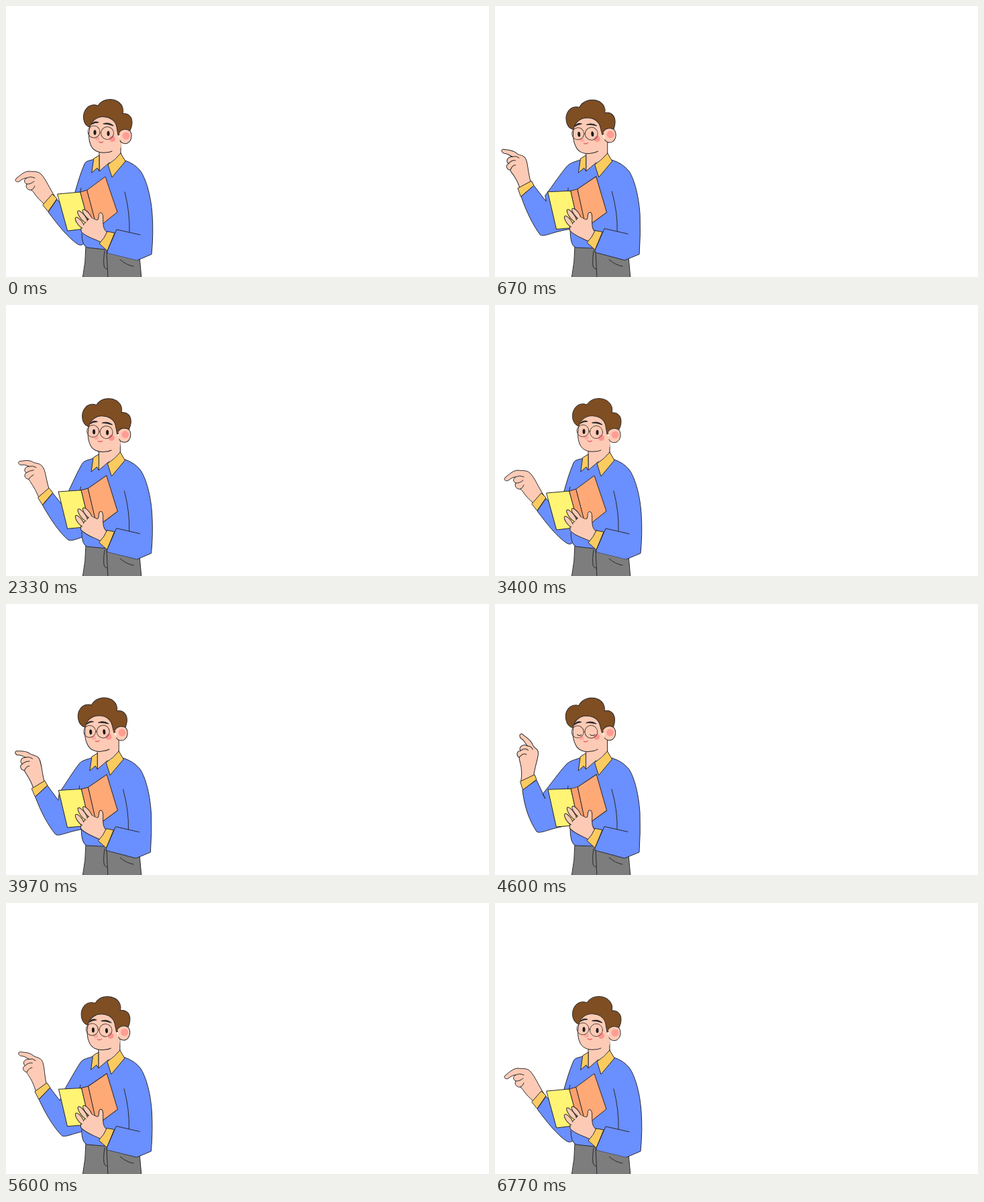
Write an HTML page that moves like this. It is 720x405 px and loops after 6810 ms.

```html
<!DOCTYPE html>
<html lang="en">
<head>
<meta charset="utf-8">
<title>Teacher with a book</title>
<style>
  html, body { margin: 0; width: 100%; height: 100%; overflow: hidden; background: #fff; }
  svg { display: block; width: 100vw; height: 100vh; }
  .ink { fill: none; stroke: #2b292c; stroke-width: 1; stroke-linecap: round; stroke-linejoin: round; }
  .skin { fill: #fdcbb5; }
  .blue { fill: #6a8ffe; }
  .gold { fill: #fccb60; }
  .hair { fill: #7f4e22; }
  .plain { stroke: none; }
</style>
</head>
<body>
<svg viewBox="0 0 720 405" class="ink">
  <path fill="#7d7d7d" d="M119 358 Q119 382 114 408 H202 L199 374 L150 362 Z"/>
  <path d="M150 366 L152 408 M147 366 Q145 379 146 388 Q147 393 151 393 M170 379 Q179 387 190 389"/>

  <path id="hand" class="skin"/>
  <path id="fingers"/>
  <path id="cuff" class="gold"/>
  <path id="arm" class="blue"/>
  <path id="torso" class="blue plain"/>
  <path id="torsoEdge"/>

  <g id="neck">
    <path class="skin plain" d="M139 205 V247 L155 234 L171 221 V196 Z"/>
    <path d="M139 217 V247 L154 234 M171 203 V221"/>
    <path class="gold" d="M131 228 L139 223 V247 L136 242 L128 249 Z"/>
    <path class="gold" d="M171 220 L178 232 L158 256 L152 237 Q164 229 171 220 Z"/>
  </g>

  <g id="head">
    <path class="hair" d="M124 181 C114 177 113 161 120 153 C125 147 132 147 137 149 C143 139 157 137 167 143 C174 148 176 155 174 161 C182 160 188 165 188 174 C188 180 186 184 184 188 L167 193 L150 180 Z"/>
    <path class="skin plain" d="M125 181 C128 170 138 164 148 166 C158 167 164 174 165 181 L167 193 L172 206 L171 212 L159 217 Q154 219 148 219 C138 220 129 216 126 207 C123 200 123 190 125 181 Z"/>
    <path d="M167 193 L165 181 C164 174 158 167 148 166 C138 164 128 170 125 181 C123 190 123 200 126 207 C129 216 138 220 148 219 Q154 219 158 217"/>
    <path class="skin" d="M169 189 C172 184 180 183 185 187 C189 193 187 202 181 205 C176 207 171 204 170 201"/>
    <circle class="plain" cx="179" cy="194" r="5.5" fill="#ff9d94"/>
    <circle class="plain" cx="158.500" cy="198.500" r="4.500" fill="#ff9490"/>
    <ellipse class="plain" cx="136" cy="198" rx="3.500" ry="3" fill="#ffaaa0"/>
    <path fill="#1d1a1c" d="M127 177 Q132 171 138 174 Q132 174 127 177 Z M145 176 Q153 173 160 179 Q152 176 145 176 Z"/>
    <g id="eyes" class="plain" fill="#1d1a1c">
      <ellipse cx="132.500" cy="189" rx="2" ry="3.800"/>
      <ellipse cx="152.500" cy="190.500" rx="2" ry="3.800"/>
    </g>
    <path id="lids" d="M130 192 Q133 195 136 193 M149 194 Q152 197 156 195"/>
    <g stroke="#5b4540">
      <path d="M140 189 H142"/>
      <circle cx="131" cy="188" r="9"/>
      <circle cx="151" cy="190" r="9.500"/>
    </g>
    <path stroke="#f06f70" fill="#f58583" d="M138 203 Q141 206 145 203 Q141 204 138 203 Z"/>
  </g>

  <g id="book">
    <path fill="#fff474" d="M77 281 L111 278 L126 332 L92 336 Z"/>
    <path fill="#fb9f6c" d="M111 278 L121 275 L136 330 L125 330 Z"/>
    <path fill="#ffa977" d="M121 275 L148 255 L166 308 L136 332 Z"/>
    <g class="skin">
      <path d="M153 340 C148 337 145 332 145 326 C144 320 146 311 142 309 C139 308 138 311 138 316 Q138 320 135 320 L126 316 L112 330 L112 337 C119 345 132 348 144 354"/>
      <ellipse rx="10" ry="3.400" transform="translate(121 312) rotate(50)"/>
      <ellipse rx="11" ry="3.600" transform="translate(114 315) rotate(52)"/>
      <ellipse rx="10" ry="3.600" transform="translate(110 324) rotate(52)"/>
      <path class="plain" d="M126 316 L136 321 L136 342 L113 337 L115 329 Z"/>
    </g>
  </g>

  <g id="sleeve">
    <path class="blue plain" d="M163 335 L190 340 L196 380 L151 369 Z"/>
    <path class="gold" d="M151 337 L162 339 L151 366 L139 355 Q147 347 151 337 Z"/>
    <path d="M200 342 L165 334 L151 366 V369"/>
  </g>
</svg>
<script>
const CYCLE = 3405;
const el = id => document.getElementById(id);

const ease = (from, to, t) => {
  const u = Math.min(1, Math.max(0, (t - from) / (to - from)));
  return u * u * (3 - 2 * u);
};

// Blends two paths that share the same commands.
const mix = (a, b, p) => {
  const ends = b.match(/-?[\d.]+/g);
  let i = 0;
  return a.replace(/-?[\d.]+/g, n => (+n + (ends[i++] - n) * p).toFixed(2));
};

const handLow = "M73,285 C64,271 60,260 53,252 C48,246 40,248 34,247 C27,247 20,254 15,258 C12,262 17,264 20,262 C24,259 27,257 31,257 C26,259 27,265 31,266 C28,271 33,276 38,275 C42,278 43,284 57,296";
const handHigh = "M53,264 C49,246 53,224 47,220 C43,217 40,218 38,214 C32,207 24,206 18,203 C14,204 16,209 19,210 C24,211 26,215 31,218 C22,217 19,224 23,228 C17,230 19,237 24,238 C24,243 33,247 36,271";
const fingersLow = "M31,257 Q36,254 43,257 M31,266 Q36,267 42,262 M38,275 Q42,273 43,269";
const fingersHigh = "M31,218 Q37,217 40,221 M23,228 Q28,221 34,224 M24,238 Q28,229 33,231";

const cuffLow = "M55,297 L69,281 L76,288 L63,307 Z";
const cuffHigh = "M33,268 L54,258 L57,265 L37,281 Z";

const armLow = "M131,229 C126,231 119,231 117,236 C111,250 107,264 103,278 L86,300 L76,289 L63,308 C78,328 92,346 107,356 C111,358 114,358 118,353";
const armHigh = w => `M127,230 C122,232 111,234 106,240 C95,252 84,268 71,284 L75,291 L${57 + 5 * w},${265 - 2 * w} L${37 + 4 * w},${281 - 3 * w} C${43 + w},305 52,325 62,340 C68,345 84,333 118,330`;

const torsoLow = "M131,229 L122,240 L112,275 L113,340 Q113,358 121,361 L150,364 L151,369 L196,380 L217,371 Q220,340 218,312 C216,280 207,255 200,246 Q192,236 178,231 L154,234 L139,246 Z";
const torsoHigh = "M127,230 L119,240 L110,275 L112,335 Q112,358 120,361 L149,363 L149,368 L193,380 L215,371 Q217,340 216,312 C214,280 206,255 199,246 Q190,235 174,230 L150,234 L135,246 Z";
const edgeLow = "M151,369 L196,380 L217,371 Q220,340 218,312 C216,280 207,255 200,246 Q192,236 178,231 M177,278 Q185,310 184,338 M113,340 Q113,358 121,361 L148,364 M112,272 L110,280";
const edgeHigh = "M149,368 L193,380 L215,371 Q217,340 216,312 C214,280 206,255 199,246 Q190,235 174,230 M174,277 Q183,309 182,337 M112,335 Q112,358 120,361 L148,362 M109,272 L108,280";

// Finger wag: -0.7 is leftmost, 1 is upright.
const wagAt = t => {
  if (t < 870) return -0.7 * ease(520, 870, t);
  if (t > 1570) return -0.7 * (1 - ease(1570, 2050, t));
  return 0.15 - 0.85 * Math.cos((t - 870) / 350 * Math.PI);
};

function draw(time) {
  const t = time % CYCLE;
  const lean = ease(0, 790, t) - ease(1470, 2650, t);
  const lift = ease(0, 850, t) - ease(1735, 2700, t);
  const turn = ease(60, 880, t) - ease(1870, 2850, t);
  const wag = wagAt(t);
  const open = 1 - ease(900, 1100, t) + ease(1310, 1490, t);
  const shape = (id, a, b, p) => el(id).setAttribute("d", mix(a, b, p));
  const place = (id, transform) => el(id).setAttribute("transform", transform);

  shape("arm", armLow, armHigh(wag), lift);
  shape("cuff", cuffLow, cuffHigh, lift);
  place("cuff", `translate(${5 * wag * lift} ${-3 * wag * lift})`);

  // The hand turns a little later than the arm, so its wrist follows the cuff.
  const lag = lift - turn;
  const dx = -16 * lag + 5 * wag * lift, dy = -25 * lag - 4 * wag * lift;
  const wristX = 61 - 16 * turn, wristY = 287 - 25 * turn;
  for (const [id, low, high] of [["hand", handLow, handHigh], ["fingers", fingersLow, fingersHigh]]) {
    shape(id, low, high, turn);
    place(id, `translate(${dx} ${dy}) rotate(${16 * wag * lift} ${wristX} ${wristY})`);
  }

  shape("torso", torsoLow, torsoHigh, lean);
  shape("torsoEdge", edgeLow, edgeHigh, lean);
  place("neck", `translate(${-3.5 * lean} 0)`);
  place("head", `translate(${-3 * lean} ${lean}) rotate(${-6 * lean} 148 235)`);
  place("book", `translate(${turn} 0) rotate(${2.8 * turn} 155 300)`);
  place("sleeve", `translate(${-2 * lean} ${-1.5 * lean})`);

  place("eyes", `translate(0 ${193 * (1 - open)}) scale(1 ${open})`);
  el("lids").setAttribute("opacity", open < 0.3 ? 1 : 0);
}

const start = performance.now();
function tick() {
  draw(performance.now() - start);
  requestAnimationFrame(tick);
}
tick();
</script>
</body>
</html>
```
